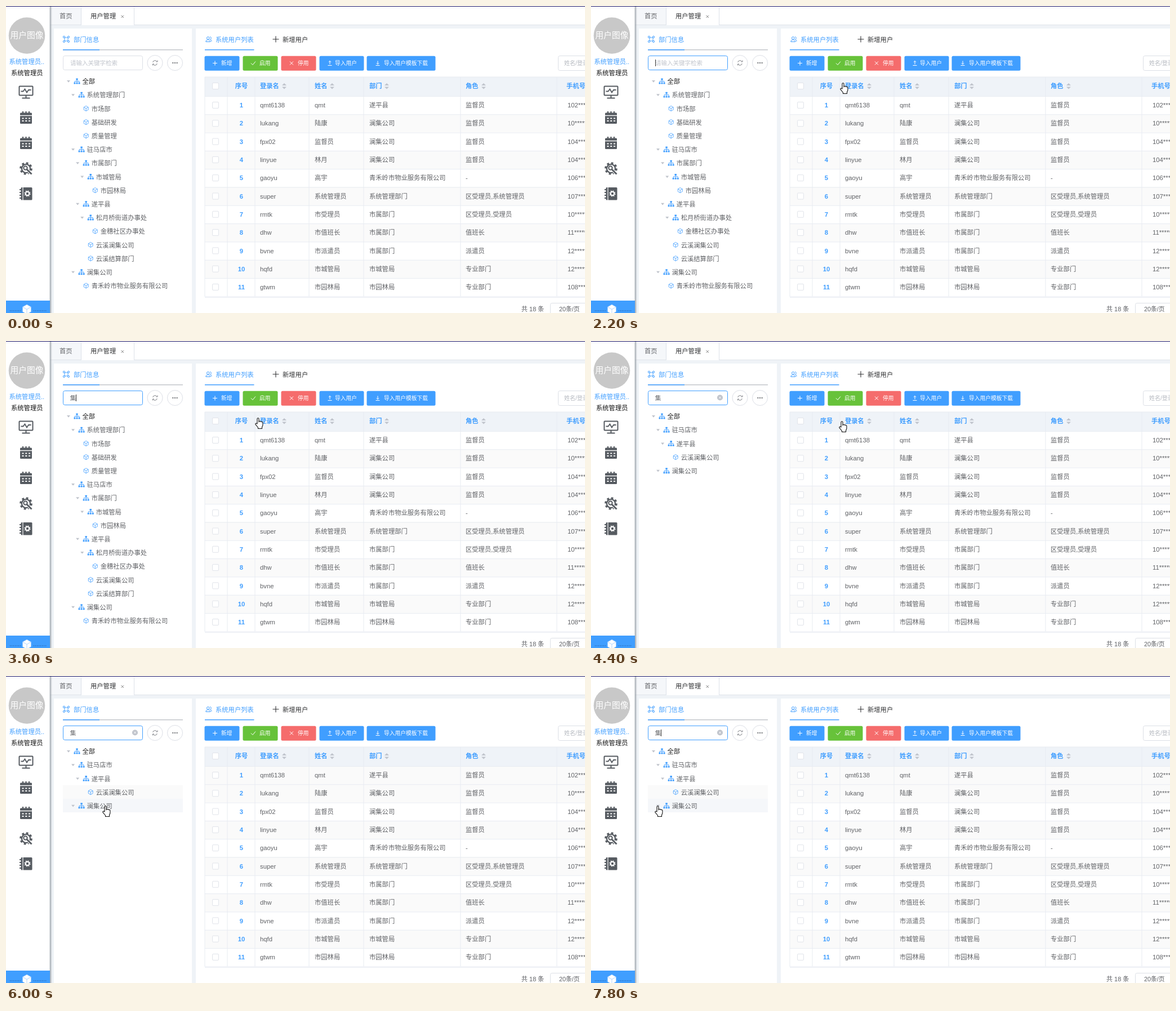
An HTML page for the animation above (8000 ms loop, 1028 by 545 pixels).

```html
<!DOCTYPE html>
<html lang="zh-CN">
<head>
<meta charset="utf-8">
<title>用户管理</title>
<style>
html, body { margin: 0; width: 100%; height: 100%; overflow: hidden; background: #eff3f7; }
svg { display: block; }
text { font-family: "Liberation Sans", "Noto Sans CJK SC", sans-serif; white-space: pre; }
.pinyin { font-family: "Liberation Mono", monospace; }
</style>
</head>
<body>
<svg id="stage" width="1028" height="545" viewBox="0 0 1028 545">
  <defs>
    <linearGradient id="peach" x2="1" y2=".25"><stop offset="0" stop-color="#f1cfbc"/><stop offset=".4" stop-color="#f3d8c8"/><stop offset="1" stop-color="#efcdb9"/></linearGradient>
    <linearGradient id="photo" x2=".7" y2="1"><stop offset="0" stop-color="#e2b79b"/><stop offset=".5" stop-color="#e6c3ab"/><stop offset="1" stop-color="#c99a78"/></linearGradient>
    <linearGradient id="edge"><stop offset="0" stop-color="#7d858e" stop-opacity=".8"/><stop offset="1" stop-color="#8d949c" stop-opacity="0"/></linearGradient>
    <filter id="soft" x="-10%" y="-20%" width="120%" height="150%"><feDropShadow dx="0" dy="1" stdDeviation="1.3" flood-color="#555" flood-opacity=".7"/></filter>
  </defs>
</svg>
<script>
const BLUE = '#409eff', INK = '#606266', LINE = '#e8ecf2', DARK = '#565b61', PALE = '#c0c4cc';
const stage = document.getElementById('stage');

function el(tag, attrs, parent = stage) {
  const node = document.createElementNS('http://www.w3.org/2000/svg', tag);
  for (const k in attrs) node.setAttribute(k, attrs[k]);
  return parent.appendChild(node);
}
const group = (parent, x = 0, y = 0) => el('g', { transform: `translate(${x} ${y})` }, parent);
const rect = (x, y, width, height, fill, more, p) => el('rect', { x, y, width, height, fill, ...more }, p);
const stroke = (d, color, width = 1, p, more) =>
  el('path', { d, fill: 'none', stroke: color, 'stroke-width': width, ...more }, p);
const shape = (d, fill, p, more) => el('path', { d, fill, ...more }, p);
const circle = (cx, cy, r, more, p) => el('circle', { cx, cy, r, ...more }, p);
// cy is the vertical middle of the line
function text(s, x, cy, fill = INK, size = 11.3, more, p) {
  const t = el('text', { x, y: cy + size * .37, fill, 'font-size': size, ...more }, p);
  t.textContent = s;
  return t;
}
const bold = { 'font-weight': 700 };
const show = (node, on) => node.setAttribute('visibility', on ? 'visible' : 'hidden');

function cube(x, y, r, color, p, fill = 'none') {
  const g = group(p, x, y), h = r / 2, w = r * .88;
  shape(`M0 ${-r}L${w} ${-h}V${h}L0 ${r}L${-w} ${h}V${-h}Z`, fill, g, { stroke: color, 'stroke-width': .8 });
  stroke(`M${-w} ${-h}L0 0L${w} ${-h}M0 0V${r}`, color, .8, g);
}
function orgIcon(x, y, p) {
  const g = group(p, x, y);
  shape('M-1.7-5h3.4v3h-3.4zM-5.5 2h2.9v2.900h-2.9zM-1.45 2h2.9v2.900h-2.9zM2.600 2h2.9v2.900h-2.9z', BLUE, g);
  stroke('M0-2V2M-4 2V0H4V2', BLUE, .9, g);
}

// Frame and tabs
rect(78, 0, 950, 34, '#fff');
rect(78, 1, 55, 33, '#f5f7fa');
stroke('M133.5 1V34M227.5 1V34', '#dde2e9');
stroke('M78 33.5H133M228 33.5H1028', '#dfe4ea');
text('首页', 95, 18);
text('用户管理', 150, 18, '#303133');
stroke('M204.5 16.5l4.500 4.500m0-4.500l-4.500 4.500', '#777', .9);
rect(85, 40, 245, 505, '#fff');
rect(337, 40, 691, 505, '#fff');

// Sidebar
rect(77.5, 1, 4.5, 544, 'url(#edge)');
rect(0, 0, 77.5, 545, '#fff');
rect(0, 0, 1028, 1, '#1c1a6b');
circle(37, 52.5, 32.3, { fill: '#c8c8c8' });
text('用户图像', 37, 52, '#fff', 14.8, { 'text-anchor': 'middle' });
text('系统管理员..', 5.5, 99, BLUE);
text('系统管理员', 9, 119, '#111');

const monitor = group(stage, 35.5, 153);
rect(-12, -10.5, 24, 16, 'none', { stroke: DARK, 'stroke-width': 2, rx: 1 }, monitor);
stroke('M-9-1.500h4l3-4 3.500 6 3-4.500h4.500', DARK, 1.8, monitor);
stroke('M0 6V10M-7 10.500H7', DARK, 2, monitor);
for (const y of [198, 243]) {
  const g = group(stage, 35.5, y);
  rect(-10.5, -8.5, 21, 19.5, DARK, { rx: 1.5 }, g);
  stroke('M-5.500-11V-6M0-11V-6M5.500-11V-6', DARK, 2.2, g);
  stroke('M-10.500-3.500H10.500', '#fff', 1.4, g);
  stroke('M-7 1.500H8M-7 6H8', '#fff', 2.200, g, { 'stroke-dasharray': '3 2.8' });
}
const gear = group(stage, 35.5, 288.5);
circle(0, 0, 7.6, { fill: 'none', stroke: DARK, 'stroke-width': 2.4 }, gear);
circle(0, 0, 9.8, { fill: 'none', stroke: DARK, 'stroke-width': 3, 'stroke-dasharray': '3.7 4' }, gear);
circle(-1, -1, 3.2, { fill: 'none', stroke: DARK, 'stroke-width': 2 }, gear);
stroke('M2 2L10 10', '#fff', 5, gear);
stroke('M1.500 1.500L10 10', DARK, 2.800, gear);
const book = group(stage, 35.5, 333);
rect(-9, -11, 20, 22.500, DARK, { rx: 1.5 }, book);
stroke('M-11.500-7h5M-11.500-2h5M-11.500 3h5M-11.500 8h5', DARK, 1.800, book);
stroke('M-5.500-11V12', '#fff', 1.2, book);
circle(2.5, 0, 3.2, { fill: 'none', stroke: '#fff', 'stroke-width': 2 }, book);
circle(2.5, 0, 4.8, { fill: 'none', stroke: '#fff', 'stroke-width': 1.6, 'stroke-dasharray': '1.9 1.87' }, book);

rect(0, 523, 78, 22, BLUE);
stroke('M7 541H26M49 541H72', '#1c528f', 1.2, stage, { 'stroke-dasharray': '1.2 1.8' });
cube(37, 538.5, 8.5, '#9ccbff', stage, '#fff');

// Department panel
const dept = group(stage, 107, 59);
stroke('M-3-3H3V3H-3Z', BLUE, .9, dept);
for (const [x, y] of [[-4, -4], [4, -4], [-4, 4], [4, 4]])
  circle(x, y, 1.6, { fill: '#fff', stroke: BLUE, 'stroke-width': 1 }, dept);
text('部门信息', 120, 59.5, BLUE);
rect(101, 77, 213, 1.5, '#c3c6cb');
rect(101, 77, 65, 1.5, BLUE);
const field = rect(101.5, 88.5, 141, 25, '#fff', { rx: 3 });
const hint = text('请输入关键字检索', 114, 101, PALE, 10.5);
const typed = text('', 113.7, 101, INK, 10.6);
const caret = rect(0, 95, 1, 12, '#333');
const clear = group(stage, 229, 100.5);
circle(0, 0, 5, { fill: PALE }, clear);
stroke('M-1.800-1.800L1.800 1.800M1.800-1.800L-1.800 1.800', '#fff', 1, clear);
for (const x of [264.5, 300]) circle(x, 101, 13.5, { fill: '#fff', stroke: '#dcdfe6' });
stroke('M260.800 100a3.800 3.800 0 0 1 7-1.500M268.200 102a3.800 3.800 0 0 1-7 1.500M269 96.500V99H266.500M260.500 105.500V103H263', '#75787d', .9);
for (const x of [296.4, 300, 303.6]) circle(x, 101, 1.1, { fill: '#505357' });

// Tree: [level, label, isLeaf]
const TREE = [
  [0, '全部'], [1, '系统管理部门'], [2, '市场部', 1], [2, '基础研发', 1], [2, '质量管理', 1],
  [1, '驻马店市'], [2, '市属部门'], [3, '市城管局'], [4, '市园林局', 1], [2, '遂平县'],
  [3, '松月桥街道办事处'], [4, '金穗社区办事处', 1], [3, '云溪澜集公司', 1], [3, '云溪结算部门', 1],
  [1, '澜集公司'], [2, '青禾岭市物业服务有限公司', 1]
];
function tree(items) {
  const g = group(stage);
  items.forEach(([level, label, leaf], i) => {
    const y = 134 + i * 24.2, dx = level * 8.07;
    if (leaf) cube(126 + dx, y - .5, 4.5, BLUE, g);
    else {
      shape(`M${108 + dx} ${y - 2}h6l-3 3.800z`, PALE, g);
      orgIcon(126 + dx, y - .5, g);
    }
    text(label, 135.5 + dx, y, level ? INK : '#222', 11.3, {}, g);
  });
  return g;
}
const treeHover = group(stage);
rect(101, 194, 213, 24, '#fafafa', {}, treeHover);
rect(101, 218, 213, 24, '#f5f7fa', {}, treeHover);
const fullTree = tree(TREE);
const foundTree = tree([0, 5, 9, 12, 14].map(i => TREE[i]));

// User panel
const people = group(stage, 360, 59);
circle(-1.2, -2, 2.3, { fill: 'none', stroke: BLUE, 'stroke-width': 1 }, people);
stroke('M-5.200 4.500c0-4.800 8-4.800 8 0zM2-4.300c3 0 3 4.300.5 4.500 2 .4 2.400 2 2.400 3.800', BLUE, 1, people);
text('系统用户列表', 372, 59.5, BLUE);
rect(353, 77, 87.5, 1.5, BLUE);
stroke('M473.500 59H484.500M479 53.500V64.500', '#303133', 1.1);
text('新增用户', 491, 59.5, '#303133');

const ICONS = {
  plus: 'M-4 0H4M0-4V4', check: 'M-4 0L-1 3L4-3', cross: 'M-3-3L3 3M3-3L-3 3',
  up: 'M0 2V-4M-2.200-1.800L0-4L2.200-1.800M-3.500 4H3.500', down: 'M0-4V2M-2.200-.2L0 2L2.200-.2M-3.500 4H3.500'
};
for (const [x, w, color, icon, ix, label, tx] of [
  [353, 61, BLUE, 'plus', 371, '新增', 382], [421, 61, '#67c23a', 'check', 439, '启用', 450],
  [489, 61, '#f56c6c', 'cross', 507, '停用', 518], [557, 78, BLUE, 'up', 575, '导入用户', 584],
  [641, 121, BLUE, 'down', 660, '导入用户模板下载', 671]
]) {
  rect(x - .5, 88.7, w + 1, 26, color, { rx: 2.5 });
  stroke(ICONS[icon], '#fff', 1, group(stage, ix, 101.5));
  text(label, tx, 101.5, '#fff', 9.75, { 'font-weight': 500 });
}
rect(980.5, 88.5, 70, 26, '#fff', { rx: 3, stroke: '#dcdfe6' });
text('姓名/登录名', 991, 101.5, '#b4b8bf', 10);

// Table
const PITCH = 32.3;
rect(353, 126, 675, 34, '#eff3f8');
for (let i = 1; i < 11; i += 2) rect(353, 160 + i * PITCH, 675, PITCH, '#fafafa');
const rowHover = rect(353, 0, 675, PITCH, '#f5f7fa');
const rowTint = rect(353, 160.5, 675, PITCH, '#fafafa');
for (const x of [353, 393, 442, 538, 635, 807, 978]) rect(x - .5, 126, 1, 390, LINE);
for (let i = 0; i < 12; i++) {
  rect(353, 160 + i * PITCH, 675, 1, LINE);
  rect(366.5, (i ? 176 + (i - 1) * PITCH : 142) - 5.5, 11, 11, '#fff', { rx: 1.5, stroke: '#e1e4ea' });
}
rect(353, 125.5, 675, 1, LINE);
rect(353, 517, 675, 1, LINE);
text('序号', 418, 142, BLUE, 11.3, { ...bold, 'text-anchor': 'middle' });
for (const [label, x, sort] of [['登录名', 451, 494], ['姓名', 548, 579], ['部门', 645, 676], ['角色', 816, 848], ['手机号', 995]]) {
  text(label, x, 142, BLUE, 11.3, bold);
  if (sort) shape(`M${sort - 4} 141h8l-4-4zM${sort - 4} 143.500h8l-4 4z`, PALE);
}
const USERS = `qmt6138|qmt|遂平县|监督员|102
lukang|陆康|澜集公司|监督员|10
fpx02|监督员|澜集公司|监督员|104
linyue|林月|澜集公司|监督员|104
gaoyu|高宇|青禾岭市物业服务有限公司|-|106
super|系统管理员|系统管理部门|区受理员,系统管理员|107
rmtk|市受理员|市属部门|区受理员,受理员|10
dhw|市值班长|市属部门|值班长|11
bvne|市派遣员|市属部门|派遣员|12
hqfd|市城管局|市城管局|专业部门|12
gtwm|市园林局|市园林局|专业部门|108`.split('\n');
USERS.forEach((line, i) => {
  const y = 176 + i * PITCH, cells = line.split('|');
  text(i + 1, 418, y, BLUE, 11.3, { ...bold, 'text-anchor': 'middle' });
  [451, 548, 645, 816, 997].forEach((x, c) => text(cells[c] + (c == 4 ? '********' : ''), x, y));
});
text('共 18 条', 915, 538, INK, 11);
rect(966.5, 527.5, 80, 26, '#fff', { rx: 3, stroke: '#dcdfe6' });
text('20条/页', 982, 538, INK, 10.8);

// Input method window
const ime = group(stage);
rect(117, 112, 317, 74.5, '#fff', { rx: 7, filter: 'url(#soft)' }, ime);
rect(129, 112, 293, 74.5, 'url(#peach)', {}, ime);
rect(333, 112, 4.5, 74.5, '#fbf1ea', {}, ime);
rect(337.5, 112, 84.5, 74.5, 'url(#photo)', {}, ime);
for (const [x, y] of [[347, 148], [354, 138], [362, 146], [370, 136], [376, 145]])
  circle(x, y, 5.5, { fill: '#f6e8dc', opacity: .85 }, ime);
stroke('M348 160Q364 122 382 160', '#a9744f', 1.4, ime);
shape('M343 160h41l-4 26.500h-33z', '#b98562', ime);
stroke('M344 166H383M345 173H382M346 180H381', '#dcb592', 1.5, ime);
shape('M385 132l28-7 6 56-28 5.500z', '#f8eee5', ime);
shape('M390 143l19-4 4 33-19 4z', '#d9a688', ime);
circle(402, 158, 6, { fill: '#a8664a' }, ime);
const pinyin = text('', 138.5, 136.5, '#b9623f', 12.6, { class: 'pinyin' }, ime);
const imeCaret = rect(153, 130, 1, 13, '#8a4a30', {}, ime);
const picks = [139, 168, 199, 230, 262].map((x, i) =>
  text('', x, 163.5, i ? '#b9704f' : '#3c1d10', 12.4, {}, ime));
shape('M298 159v8l-4-4z', '#dba88e', ime);
shape('M303 159v8l5-4z', '#b9623f', ime);
rect(313.5, 158.5, 10, 9, 'none', { stroke: '#e0b8a2' }, ime);
shape('M316 161.500h5l-2.500 3z', '#c98a6c', ime);

// Pointers
const outline = { stroke: '#111', 'stroke-width': 1.1, 'stroke-linejoin': 'round' };
const pointer = {
  hand: shape('M4 2.200a1.500 1.500 0 0 1 3 0V8l.1-1a1.400 1.400 0 0 1 2.600.3a1.300 1.300 0 0 1 2.300.5a1.200 1.200 0 0 1 1.900 1V13.500L12.500 17V19.500H5.500V17.500L1 12.200a1.500 1.500 0 0 1 2-2L4 11Z', '#fff', group(stage), outline),
  arrow: shape('M5 0V14.500L8.300 11.500L10.500 16.500L12.700 15.500L10.500 10.700H15Z', '#fff', group(stage), outline),
  beam: stroke('M3-6H5M6-6H8M5.500-6V7M3 7H5M6 7H8', '#222', 1, group(stage))
};

// Pointer way: [ms, x, y]
const WAY = [
  [100, 908, 90], [500, 520, 100], [700, 251, 115], [800, 200, 104], [1200, 200, 104], [1700, 442, 136],
  [4300, 442, 136], [4400, 440, 142], [4600, 336, 203], [4800, 232, 214], [5100, 141, 220], [5200, 141, 221],
  [5300, 139, 224], [5400, 139, 224], [5600, 110, 240], [5800, 150, 242], [6000, 171, 230], [6300, 114, 239],
  [6500, 125, 241], [6800, 159, 236], [7000, 150, 230], [7200, 128, 232], [7600, 115, 231], [7700, 115, 231],
  [7800, 113, 230], [8000, 113, 230]
];
const CARET = [[1200, 1700], [2200, 3000], [3500, 4100], [4600, 5100], [5500, 6000], [6500, 7000], [7500, 8000]];

function pointAt(t) {
  const i = Math.max(1, WAY.findIndex(p => p[0] >= t));
  const [a, b] = [WAY[i - 1], WAY[i]], k = (t - a[0]) / (b[0] - a[0]);
  return [1, 2].map(n => Math.round(a[n] + (b[n] - a[n]) * k));
}

function render(ms) {
  const t = Math.floor(ms / 100) * 100;
  const [x, y] = pointAt(t), tip = x + 5;
  const inField = tip > 101 && tip < 243 && y > 88 && y < 114;
  const inRows = tip > 353 && y > 160;
  const kind = inField ? 'beam' : tip > 314 && y > 160 ? 'arrow' : 'hand';
  for (const k in pointer) {
    pointer[k].parentNode.setAttribute('transform', `translate(${x} ${y})`);
    show(pointer[k], t >= 100 && k === kind);
  }
  field.setAttribute('stroke', t >= 1200 ? BLUE : t >= 100 && inField ? PALE : '#dcdfe6');

  const value = t < 2400 ? '' : t < 2500 ? 'j' : t < 3500 ? 'ji' : '集';
  typed.textContent = value;
  show(hint, !value);
  show(caret, CARET.some(([on, off]) => t >= on && t < off));
  caret.setAttribute('x', { '': 114, j: 116.5, ji: 119, 集: 124 }[value]);

  const composing = t >= 2400 && t < 3500;
  ime.style.display = composing ? '' : 'none';
  if (composing) {
    pinyin.textContent = value;
    imeCaret.setAttribute('x', value === 'j' ? 146 : 153);
    show(imeCaret, t < 2900 || t >= 3100);
    picks.forEach((p, i) => p.textContent = `${i + 1}.${(value === 'j' ? '就家将及叫' : '集及急级几')[i]}`);
  }

  const found = t >= 3700;
  show(fullTree, !found);
  show(foundTree, found);
  show(clear, found);
  show(treeHover, t >= 5000);
  show(rowTint, t >= 4600);
  show(rowHover, t >= 100 && inRows);
  rowHover.setAttribute('y', 160.5 + Math.floor((y - 160) / PITCH) * PITCH);
}

const start = performance.now();
function tick() {
  render((performance.now() - start) % 8000);
  requestAnimationFrame(tick);
}
tick();
</script>
</body>
</html>
```
